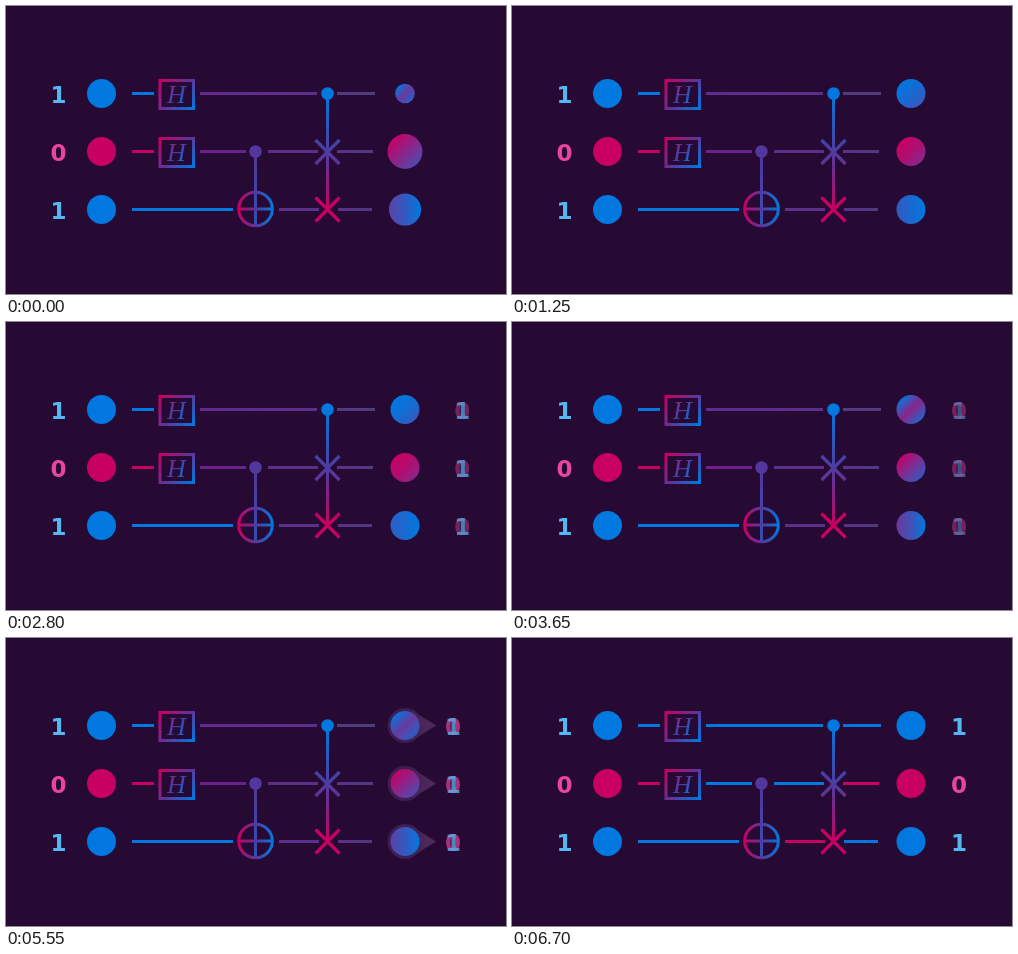
Recreate the animation shown at these times as an HTML page with a canvas. Size 500x288 px, loop 6.85 s.

```html
<!DOCTYPE html>
<html lang="en">
<head>
<meta charset="utf-8">
<title>Quantum circuit</title>
<style>
html, body { margin: 0; width: 100%; height: 100%; overflow: hidden; background: #260a33; }
canvas { display: block; }
</style>
</head>
<body>
<canvas id="stage" width="500" height="288"></canvas>
<script>
const ctx = document.getElementById('stage').getContext('2d');
const LOOP = 6850, LAST = 6700, STEP = 50;
const BG = [38, 10, 51], BLUE = [0, 120, 224], PINK = [200, 0, 98], PURPLE = [92, 47, 139];
const CYAN = [84, 183, 242], ROSE = [232, 70, 158];
const rows = [
  { y: 87.5, bit: 1, start: -51 },
  { y: 145.5, bit: 0, start: -96 },
  { y: 203.5, bit: 1, start: -85 }
];

const clamp = v => Math.max(0, Math.min(1, v));
const ramp = (t, a, b) => clamp((t - a) / (b - a));
const smooth = p => p * p * (3 - 2 * p);
const mix = (a, b, p) => a.map((v, i) => v + (b[i] - v) * p);
const css = (c, a = 1) => `rgba(${c.map(Math.round).join(',')},${a})`;

function gradient(x0, y0, x1, y1, ...colors) {
  const g = ctx.createLinearGradient(x0, y0, x1, y1);
  colors.forEach((c, i) => g.addColorStop(i / (colors.length - 1), css(c)));
  return g;
}

function line(x0, y0, x1, y1, style, width = 3) {
  ctx.strokeStyle = style;
  ctx.lineWidth = width;
  ctx.beginPath();
  ctx.moveTo(x0, y0);
  ctx.lineTo(x1, y1);
  ctx.stroke();
}

function disc(x, y, r, style) {
  ctx.fillStyle = style;
  ctx.beginPath();
  ctx.arc(x, y, r, 0, Math.PI * 2);
  ctx.fill();
}

function digit(n, x, y, alpha = 1) {
  ctx.font = 'bold 23px "DejaVu Sans", sans-serif';
  ctx.fillStyle = css(n ? CYAN : ROSE, alpha);
  ctx.fillText(n, x, y + 9.5);
}

function hadamard(y) {
  ctx.lineWidth = 3;
  ctx.strokeStyle = gradient(155, y - 14, 187, y + 15, PINK, [100, 50, 150], BLUE);
  ctx.strokeRect(154, y - 13, 33.5, 28);
  ctx.font = 'italic 26px "Liberation Serif", serif';
  ctx.fillStyle = gradient(161, y - 8, 181, y + 9, [150, 30, 125], [70, 65, 170], BLUE);
  ctx.fillText('H', 170.5, y + 9.5);
}

function cross(y, style) {
  line(309.5, y - 12, 333.5, y + 12, style, 3.2);
  line(309.5, y + 12, 333.5, y - 12, style, 3.2);
}

// Wires settle from a shared purple to the measured colour.
function wires(settled) {
  const [a, b, c] = rows.map(r => r.y);
  line(126, a, 148, a, css(BLUE));
  line(126, b, 148, b, css(PINK));
  line(126, c, 227, c, css(BLUE));
  const wire = (x0, x1, y, from, to, end) =>
    line(x0, y, x1, y, gradient(x0, y, x1, y, mix(from, end, settled), mix(to, end, settled)));
  const violet = [112, 30, 142], dim = [78, 60, 126];
  wire(194, 311, a, [98, 40, 142], PURPLE, BLUE);
  wire(331, 369, a, dim, dim, BLUE);
  wire(194, 240, b, violet, [100, 36, 142], BLUE);
  wire(262, 312, b, PURPLE, PURPLE, BLUE);
  wire(331, 367, b, PURPLE, dim, PINK);
  wire(273, 313, c, PURPLE, PURPLE, PINK);
  wire(332, 366, c, PURPLE, dim, BLUE);
}

function gates() {
  const indigo = [78, 60, 160];
  hadamard(rows[0].y);
  hadamard(rows[1].y);

  line(249.5, 146, 249.5, 220, gradient(249, 146, 249, 220, [84, 55, 155], [50, 78, 180]));
  disc(249.5, 145.5, 6.3, css([84, 55, 158]));
  const ring = gradient(232, 203, 267, 203, PINK, [88, 55, 155], BLUE);
  line(233, 203, 266, 203, ring);
  ctx.beginPath();
  ctx.arc(249.5, 203, 16.8, 0, Math.PI * 2);
  ctx.stroke();

  line(321.5, 88, 321.5, 203.5, gradient(321, 88, 321, 204, BLUE, indigo, PINK));
  disc(321.5, 87.5, 6.3, css(BLUE));
  cross(146, gradient(321, 134, 321, 158, [64, 68, 168], [98, 50, 150]));
  cross(203.5, css(PINK));
}

function cone(y, strength) {
  if (!strength) return;
  ctx.globalAlpha = strength;
  disc(399, y, 17.5, css([61, 29, 82]));
  ctx.beginPath();
  ctx.moveTo(406, y - 15);
  ctx.lineTo(430, y);
  ctx.lineTo(406, y + 15);
  ctx.fillStyle = gradient(400, y, 430, y, [65, 32, 83], [78, 43, 92]);
  ctx.fill();
  ctx.globalAlpha = 1;
}

function qubit(i, t, wave, settled) {
  const { y, start } = rows[i];
  const x = 399, s = (t - start) / 1000;
  const r = 14.5 * (1 - Math.exp(-7.8 * s) * Math.cos(21 * s));
  const d = r * 0.75, free = 1 - settled;
  const blend = (base, other, p) => mix(base, other, p * free);
  const fills = [
    () => gradient(x - d, y - d, x + d, y + d, BLUE,
      blend(BLUE, PINK, 0.08 + 0.62 * wave), blend(BLUE, PINK, 0.28 - 0.12 * wave)),
    () => gradient(x - d, y - d, x + d, y + d, PINK,
      blend(PINK, BLUE, 0.1 + 0.28 * wave), blend(PINK, BLUE, 0.32 + 0.42 * wave)),
    () => gradient(x - r, y, x + r, y,
      blend(BLUE, PINK, 0.22 + 0.33 * wave), blend(BLUE, PINK, 0.12 + 0.2 * wave), BLUE)
  ];
  disc(x, y, r, fills[i]());
}

function result({ y, bit }, t, wave, settled) {
  if (t < 2600) return;
  const p = ramp(t, 2600, 3030);
  const x = 447 + 60 * (1 - p) ** 3;
  const boost = ramp(t, 5200, 5550) * 0.25;
  const show = ramp(t, 2550, 2800);
  const alpha = [0.42 + boost, 0.68 - 0.26 * wave + boost];
  for (const n of [0, 1]) {
    const end = n === bit ? 1 : 0;
    digit(n, x, y, show * (alpha[n] + (end - alpha[n]) * settled));
  }
}

function draw(t) {
  const wave = 0.5 + 0.5 * Math.cos(2 * Math.PI * (t - 300) / 1650);
  const settled = smooth(ramp(t, 5700, 6300));
  const beam = ramp(t, 5400, 5550) * (1 - ramp(t, 5550, 5750));
  ctx.fillStyle = css(BG);
  ctx.fillRect(0, 0, 500, 288);
  ctx.textAlign = 'center';
  wires(settled);
  gates();
  rows.forEach((row, i) => {
    digit(row.bit, 52.5, row.y);
    disc(95.5, row.y, 14.5, css(row.bit ? BLUE : PINK));
    cone(row.y, beam);
    qubit(i, t, wave, settled);
    result(row, t, wave, settled);
  });
}

const origin = performance.now();
function tick() {
  const t = (performance.now() - origin) % LOOP;
  draw(Math.min(LAST, Math.floor(t / STEP) * STEP));
  requestAnimationFrame(tick);
}
tick();
</script>
</body>
</html>
```
